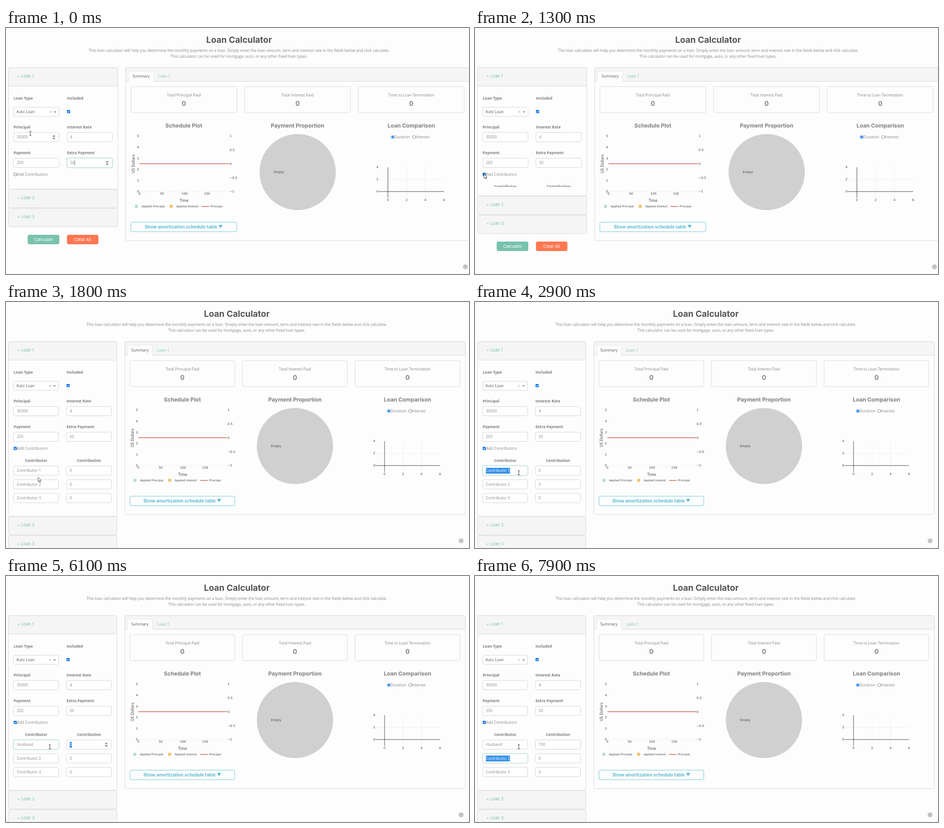
An HTML page for the animation above (8 s loop, 1025 by 546 pixels).

```html
<!DOCTYPE html>
<html lang="en">
<head>
<meta charset="utf-8">
<title>Loan Calculator</title>
<style>
html, body { margin: 0; width: 100%; height: 100%; overflow: hidden; background: #fdfdfd; }
svg { display: block; }
text { font: 8.5px "Open Sans", "Noto Sans", sans-serif; fill: #858585; white-space: pre; }
.mid { text-anchor: middle; }
.end { text-anchor: end; }
.label { font-weight: 700; font-size: 8.4px; fill: #7c7c7c; }
.dark { fill: #555; }
.link { fill: #78c2ad; }
.title, .head, .num, .loan, .btn, .wide { font-family: Inter, sans-serif; }
.title { font-size: 19px; font-weight: 700; fill: #555; }
.head { font-size: 12.2px; font-weight: 700; fill: #808080; }
.num { font-size: 14px; font-weight: 700; fill: #808080; }
.loan { font-size: 9.2px; fill: #78c2ad; }
.btn { font-size: 9.3px; fill: #fff; }
.wide { font-size: 9.7px; font-weight: 700; fill: #5fbccf; }
.tick, .axis, .key { font-family: "DejaVu Sans", sans-serif; fill: #444; }
.tick { font-size: 7px; }
.axis { font-size: 8px; }
.key { font-size: 6.2px; }
.hint { font-size: 6.6px; font-weight: 700; fill: #333; }
</style>
</head>
<body>
<svg id="stage" width="1025" height="546" viewBox="0 0 1025 546"></svg>
<script>
const stage = document.getElementById('stage');
const pen = document.createElement('canvas').getContext('2d');
const LOOP = 8000, STEP = 100, BORDER = '#d5d8e2';
const HUSBAND = [3900, 4400, 4700, 5000, 5200, 5500, 5800];
const HUNDRED = [7000, 7400, 7500];
const PATH = [[200, 54, 234], [700, 20, 324], [1300, 20, 324], [1800, 71, 389], [2200, 97, 379]];

const clamp = v => Math.max(0, Math.min(1, v));
const count = (times, t) => times.filter(k => t >= k).length;
const fade = (t, on, off) => clamp((t - on) / 150) - clamp((t - off) / 150);
const textWidth = s => {
  pen.font = '8.5px "Open Sans", "Noto Sans", sans-serif';
  return pen.measureText(s).width;
};

// Solves the CSS "ease" curve for progress p.
function ease(p) {
  const bez = (u, a, b) => 3 * u * (1 - u) ** 2 * a + 3 * u * u * (1 - u) * b + u ** 3;
  let lo = 0, hi = 1;
  for (let i = 0; i < 20; i++) {
    const u = (lo + hi) / 2;
    if (bez(u, .25, .25) < p) lo = u; else hi = u;
  }
  return bez(lo, .1, 1);
}

function pointer(t) {
  const i = PATH.findIndex(k => t < k[0]);
  if (i < 1) return (i ? PATH.at(-1) : PATH[0]).slice(1);
  const [t0, x0, y0] = PATH[i - 1], [t1, x1, y1] = PATH[i], p = (t - t0) / (t1 - t0);
  return [x0 + (x1 - x0) * p, y0 + (y1 - y0) * p];
}

const text = (x, y, s, cls = '') => `<text x="${x}" y="${y}" dy=".35em" class="${cls}">${s}</text>`;
const box = (x, y, w, h, fill = '#fdfdfd', stroke = BORDER, r = 3, more = '') =>
  `<rect x="${x}" y="${y}" width="${w}" height="${h}" rx="${r}" fill="${fill}" stroke="${stroke}" ${more}/>`;
const path = (d, stroke, w = 1, fill = 'none') =>
  `<path d="${d}" stroke="${stroke}" stroke-width="${w}" fill="${fill}"/>`;

function checkbox(x, y, on, hover) {
  if (!on) return box(x + .5, y + .5, 6, 6, '#fff', '#777', 1);
  return box(x, y, 7, 7, hover ? '#0058b8' : '#0b70e0', 'none', 1) +
    path(`M${x + 1.4} ${y + 3.6}l1.6 1.6 2.7 -3.4`, '#fff', 1.1);
}

const radio = (x, on) => `<circle cx="${x}" cy="242" r="3.4" fill="#fff" stroke="${on ? '#0b70e0' : '#777'}" stroke-width=".9"/>` +
  (on ? `<circle cx="${x}" cy="242" r="2.1" fill="#0b70e0"/>` : '');

function field(x, y, w, value, { glow = 0, selected, caret, spinner } = {}) {
  const mid = y + 10.5, tx = x + 7, len = textWidth(value);
  let s = '';
  if (glow) s += box(x, y, w, 20.5, 'none', '#78c2ad', 4, `stroke-width="4" stroke-opacity="${.25 * glow}"`);
  s += box(x, y, w, 20.5, '#fff', glow > .5 ? '#bce1d6' : '#ced3df', 3);
  if (selected) s += box(tx, mid - 6.5, len, 13, '#3390e8', 'none', 0);
  s += selected ? `<g style="--c:#fff">${text(tx, mid, value).replace('<text', '<text style="fill:#fff"')}</g>` : text(tx, mid, value);
  if (caret) s += path(`M${tx + len + .5} ${mid - 5.5}v11`, '#444', .8);
  if (spinner) {
    const sx = x + w - 11.5;
    s += box(sx - 4, mid - 6, 8, 12, '#f0f0f0', 'none', 0) +
      path(`M${sx - 2.2} ${mid - 1.6}h4.4l-2.2 -2.6zM${sx - 2.2} ${mid + 1.6}h4.4l-2.2 2.6z`, 'none', 0, '#444');
  }
  return s;
}

function form(t, x, grow, mx, my) {
  const w = x(101, 100) - .5, c1 = 17, c2 = x(135, 134);
  const right = c1 - 11 + x(241.5, 239.5), bottom = 357.5 + grow;
  const over = (fx, fy) => mx >= fx && mx <= fx + w && my >= fy && my <= fy + 20.5;
  let beam = false;
  const input = (fx, fy, value, o = {}) => {
    const hover = over(fx, fy);
    beam = beam || hover;
    return field(fx, fy, w, value, { ...o, spinner: o.number && (hover || o.focus) });
  };
  const number = (fx, fy, value, o) => input(fx, fy, value, { number: true, ...o });
  const header = (y, n) => box(5.5, y, right - 5.5, 41, '#f5f5f5') + text(25, y + 18.3, `+ Loan ${n}`, 'loan');

  let s = box(5.5, 88, right - 5.5, bottom - 88) + header(88, 1) +
    text(c1, 156, 'Loan Type', 'label') + text(c2, 156, 'Included', 'label') +
    box(c1, 176, w, 20, '#fff', '#ced3df') + text(23, 186.3, 'Auto Loan', 'dark') +
    path(`M${c1 + w - 21} 184l4 4m0 -4l-4 4`, '#999', .8) +
    path(`M${c1 + w - 12} 185h6l-3 3.2z`, 'none', 0, '#888') +
    checkbox(c2, 182, true) +
    text(c1, 220.5, 'Principal', 'label') + text(c2, 220.5, 'Interest Rate', 'label') +
    number(c1, 232, '35000') + number(c2, 232, '4') +
    text(c1, 277.5, 'Payment', 'label') + text(c2, 277.5, 'Extra Payment', 'label') +
    number(c1, 289, '250') +
    number(c2, 289, '50', { glow: fade(t, -200, 900), focus: t < 900, caret: t < 500 }) +
    checkbox(17, 321.5, t >= 900, t < 1400) + text(24, 325.5, 'Add Contributors');

  if (grow) {
    const name = t < 3900 ? 'Contributor 1' : 'Husband'.slice(0, count(HUSBAND, t));
    const amount = '100'.slice(0, count(HUNDRED, t)) || '0';
    s += `<svg width="1025" height="${338 + grow}">` +
      text(c1 + w / 2, 352.5, 'Contributor', 'label mid') + text(c2 + w / 2, 352.5, 'Contribution', 'label mid') +
      input(c1, 364, name, {
        glow: fade(t, 2300, 6100), selected: t >= 2900 && t < 3900,
        caret: t >= 2400 && t < 6100 && (t < 2900 || t >= 3900)
      }) +
      number(c2, 364, amount, {
        glow: fade(t, 6100, 7800), focus: t >= 6100 && t < 7800,
        selected: t >= 6100 && t < 7000, caret: t >= 7000 && t < 7800
      }) +
      input(c1, 394.5, 'Contributor 2', { glow: fade(t, 7800, LOOP + 999), selected: t >= 7800 }) +
      number(c2, 394.5, '0') +
      input(c1, 425, 'Contributor 3') + number(c2, 425, '0') + '</svg>';
    if (t >= 4000 && t < 5800)
      s += box(17, 387.5, 108, 28, '#fff', 'none', 2, 'style="filter:drop-shadow(0 1px 1.5px #0006)"') +
        text(24, 401, 'Husband', 'hint');
  }
  s += header(bottom + .5, 2) + header(bottom + 42.7, 3) +
    box(48, 459 + grow, 70, 21, '#78c2ad', 'none', 4) + text(83, 469.3 + grow, 'Calculate', 'btn mid') +
    box(135, 459 + grow, 69.5, 21, '#ff7851', 'none', 4) + text(169.5, 469.3 + grow, 'Clear All', 'btn mid');
  return [s, beam];
}

function schedule(x, mid) {
  const x0 = x(295.5, 293), x1 = x(494, 489.5), step = (x1 - x0) / 3.98, dx = x(0, -3.5);
  let s = path(`M${x0} 363H${x1}`, '#eeeef4') + path(`M${x0} 301.2H${x1}`, '#d6604d', 1.6);
  for (let i = 0; i < 6; i++) s += text(x0 - 1, 363 - i * 24.65, i, 'tick end');
  ['−1', '−0.5', '0', '0.5', '1'].forEach((v, i) => s += text(x1 + 1, 363 - i * 30.8, v, 'tick'));
  for (let i = 0; i < 4; i++) s += text(x0 + i * step, 368, i * 50, 'tick mid');
  return s + text(mid + .5, 383, 'Time', 'axis mid') +
    `<g transform="translate(${x(282, 279.7)} 301.5) rotate(-90)">${text(0, 0, 'US Dollars', 'axis mid')}</g>` +
    `<g transform="translate(${dx})">` +
    box(285.5, 392.5, 6.5, 6.5, '#b4ddd0', 'none', 0) + text(300, 396, 'Applied Principal', 'key') +
    box(362.5, 392.5, 6.5, 6.5, '#f3c06b', 'none', 0) + text(377, 396, 'Applied Interest', 'key') +
    path('M433 396h17', '#d6604d', 1.5) + text(453, 396, 'Principal', 'key') + '</g>';
}

function comparison(x) {
  const x0 = x(845.5, 838), left = x(825, 818), step = x(41.5, 41), end = x0 + 3 * step;
  let s = path(`M${x0 + step} 309v68M${x0 + 2 * step} 309v68M${left} 336H${end}`, '#eeeee8') +
    path(`M${x0} 309v68M${left} 363H${end}`, '#444');
  for (let i = 0; i < 4; i++) s += text(x0 + i * step, 382, i * 2, 'tick mid');
  for (let i = 0; i < 3; i++) s += text(left - .5, 363 - i * 27, i * 2, 'tick end');
  const r = x(856, 847.5);
  return s + radio(r, true) + text(r + 3.8, 242.3, 'Duration') + radio(r + 47.3, false) + text(r + 51, 242.3, 'Interest');
}

function results(x) {
  const left = x(265, 263), w = x(762, 754), cardW = x(234.5, 232), gap = x(251.7, 249.2);
  const first = x(276.5, 274.5), mids = [0, 1, 2].map(i => first + cardW / 2 + i * gap);
  const tab = left + 6, pie = x(645.7, 639.7);
  let s = box(left, 88, w, 384) + box(left, 88, w, 30.5, '#f5f5f5') +
    path(`M${tab} 119V98q0 -2 2 -2h${x(52, 51)}q2 0 2 2V119`, '#e4e6ea', 1, '#fdfdfd') +
    text(tab + x(28, 27.5), 107.3, 'Summary', 'dark mid') + text(left + 72, 107.3, 'Loan 1', 'link');
  ['Total Principal Paid', 'Total Interest Paid', 'Time to Loan Termination'].forEach((label, i) =>
    s += box(first + i * gap, 130, cardW, 58) + text(mids[i], 149, label, 'mid') + text(mids[i], 168.3, '0', 'num mid'));
  ['Schedule Plot', 'Payment Proportion', 'Loan Comparison'].forEach((label, i) =>
    s += text(mids[i], 217, label, 'head mid'));
  return s + schedule(x, mids[0]) +
    `<circle cx="${pie}" cy="319.7" r="84.4" fill="#d0d0d0"/>` + text(pie - 41.7, 320, 'Empty', 'tick mid') +
    comparison(x) +
    box(first, 431, cardW, 21, '#fdfdfd', '#6cc3d5') +
    text(mids[0], 441.3, 'Show amortization schedule table ▼', 'wide mid');
}

function scene(t) {
  const narrow = t >= 1400, x = (a, b) => narrow ? b : a;
  const grow = 118 * ease(clamp((t - 1258) / 350)) * (t > 1258);
  const [mx, my] = pointer(t), [left, beam] = form(t, x, grow, mx, my), mid = x(516, 511);
  const cursor = beam
    ? path('M-2 -4.5H2M0 -4.5V4.5M-2 4.5H2', '#333')
    : path('M0 0V9.5L2.2 7.5 3.8 11 5.3 10.3 3.8 7H6.8Z', '#222', .8, '#fff');
  return text(mid, 26.3, 'Loan Calculator', 'title mid') +
    text(mid, 50, 'This loan calculator will help you determine the monthly payments on a loan. Simply enter the loan amount, term and interest rate in the fields below and click calculate.', 'mid') +
    text(mid, 63.5, 'This calculator can be used for mortgage, auto, or any other fixed loan types.', 'mid') +
    left + results(x) +
    `<circle cx="${x(1017, 1007.5)}" cy="530" r="5.5" fill="#c4c4c4"/>` +
    `<g transform="translate(${mx} ${my})">${cursor}</g>`;
}

const start = performance.now();
let shown = -1;
function tick() {
  const t = Math.floor((performance.now() - start) % LOOP / STEP) * STEP;
  if (t !== shown) stage.innerHTML = scene(shown = t);
  requestAnimationFrame(tick);
}
tick();
</script>
</body>
</html>
```
